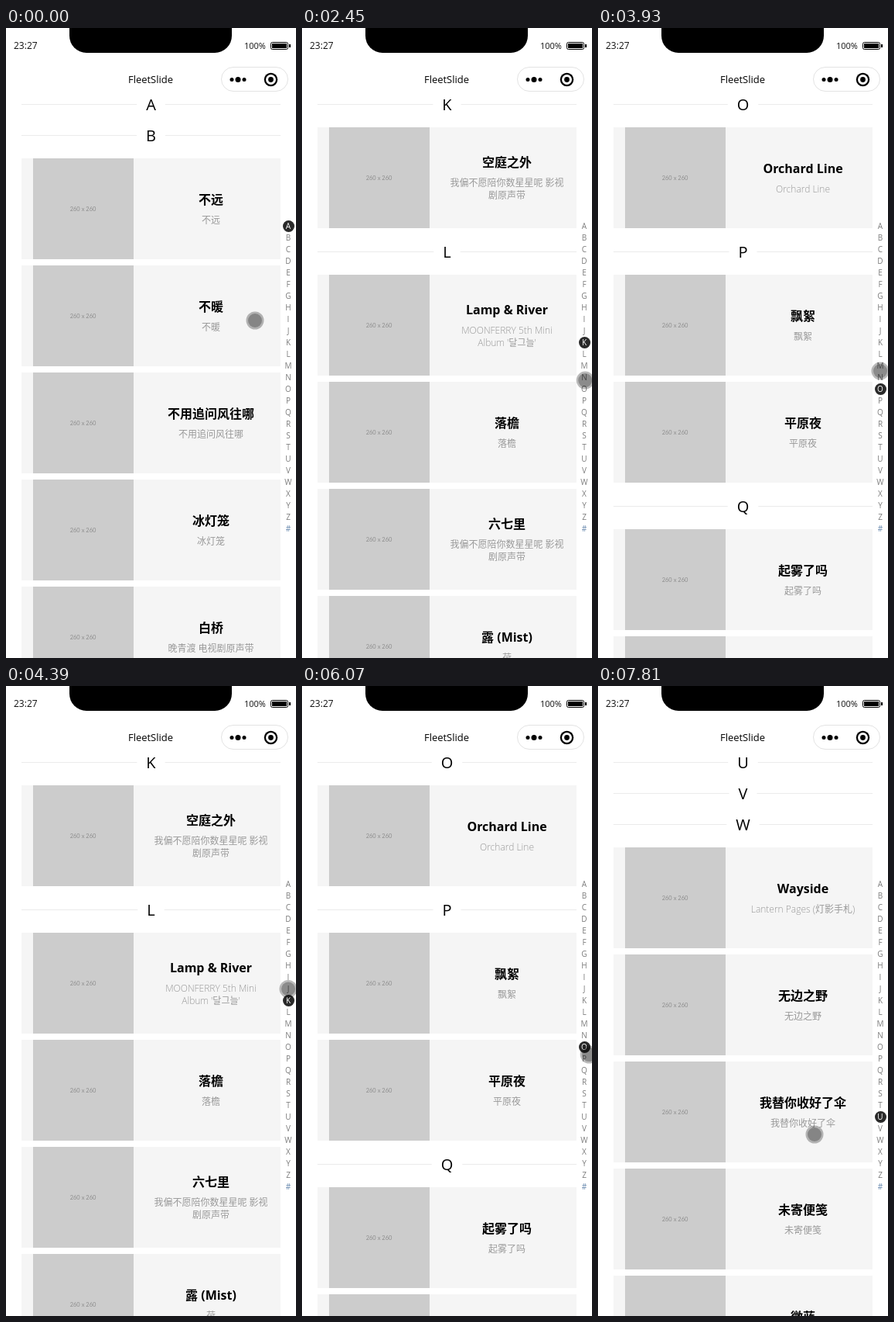
Recreate the animation shown at these times as an HTML page with a canvas. Size 375 by 812 pixels, loop 7910 ms.

```html
<!DOCTYPE html>
<html lang="zh">
<head>
<meta charset="utf-8">
<title>FleetSlide</title>
<style>
  html, body { margin: 0; width: 100%; height: 100%; overflow: hidden; background: #fff; }
  canvas { display: block; width: 375px; height: 812px; }
</style>
</head>
<body>
<canvas id="stage"></canvas>
<script>
const W = 375, H = 812, LOOP = 7910, TICK = 92;
const FONT = '"Open Sans", "Noto Sans CJK SC", "Noto Sans CJK", sans-serif';
const LETTERS = 'ABCDEFGHIJKLMNOPQRSTUVWXYZ#';
const INDEX_X = 365, INDEX_TOP = 255, INDEX_STEP = 15;
const DRAMA = '晚青渡 电视剧原声带';
const SERIES = '我偏不愿陪你数星星呢 影视\n剧原声带';

// Each entry is a title, or "title|subtitle" when they differ.
const SONGS = {
  B: ['不远', '不暖', '不用追问风往哪', '冰灯笼', '白桥|' + DRAMA],
  G: ['孤檐', '关于晴天', '归巢里'],
  H: ['海盐糖', '画窗', '和风旧信'],
  J: ['旧码头', '借光'],
  K: ['空庭之外|' + SERIES],
  L: ["Lamp & River|MOONFERRY 5th Mini\nAlbum '달그늘'", '落檐', '六七里|' + SERIES, '露 (Mist)|荷'],
  M: ['慢车窗', '梦里檐声'],
  N: ['南岸灯', '你说的晚霞'],
  O: ['Orchard Line'],
  P: ['飘絮', '平原夜'],
  Q: ['起雾了吗', '浅滩', '晴窗'],
  R: ['日暮渡', '热浪边'],
  S: ['Salt Comet|Velvetaria',
      'Sundial (Odel\nFarnik Remix)|Sundial (Odel Farnik Remix)',
      '霜 (ICE)|荷', '拾叶|' + DRAMA,
      '山谷不曾随意沉睡\n(纯享版)|拂晓台2031 第5期 (纯享版)'],
  T: ['听檐', '天边石'],
  W: ['Wayside|Lantern Pages (灯影手札)', '无边之野', '我替你收好了伞', '未寄便笺', '微蓝']
};

const REST = { x: 322, y: 377 };
const MOVES = [
  { from: 80, to: 610, x: 365, y: 343 },
  { from: 1070, to: 1530, x: 367, y: 404 },
  { from: 2170, to: 2910, x: 365, y: 524 },
  { from: 3290, to: 4590, x: 365, y: 375 },
  { from: 4770, to: 5510, x: 370, y: 408 },
  { from: 5590, to: 6530, x: 372, y: 526 },
  { from: 6620, to: 7070, x: 367, y: 559 },
  { from: 7350, to: 7810, x: 280, y: 578 }
];
const FIRST_TAP = 790, SECOND_TAP = 1990, DRAG_START = 3110, DRAG_END = 7070, DRAG_LAG = 100;

const canvas = document.getElementById('stage');
const ratio = window.devicePixelRatio || 1;
canvas.width = W * ratio;
canvas.height = H * ratio;
const ctx = canvas.getContext('2d');
ctx.scale(ratio, ratio);

const ease = k => k * k * (3 - 2 * k);

// The pointer is sampled in ticks, so it advances in even jumps of time.
function pointerAt(time) {
  let { x, y } = REST;
  for (const move of MOVES) {
    if (time < move.from) break;
    const span = move.to - move.from;
    const gaps = Math.round(span / TICK);
    const done = Math.floor((time - move.from) / span * gaps + 1.1);
    const k = ease(Math.min(1, done / (gaps + 1)));
    x += (move.x - x) * k;
    y += (move.y - y) * k;
  }
  return { x, y };
}

function letterAt(time) {
  if (time < FIRST_TAP) return 0;
  let touch = Math.min(time - DRAG_LAG, DRAG_END);
  if (time < DRAG_START) touch = time < SECOND_TAP ? FIRST_TAP : SECOND_TAP;
  return Math.round((pointerAt(touch).y - INDEX_TOP) / INDEX_STEP);
}

function text(str, x, y, size, color, weight = 'normal', align = 'center', family = FONT) {
  ctx.font = `${weight} ${size}px ${family}`;
  ctx.textAlign = align;
  ctx.fillStyle = color;
  ctx.fillText(str, x, Math.round(y + size * 0.36));
}

function rect(x, y, w, h, color) {
  ctx.fillStyle = color;
  ctx.fillRect(x, y, w, h);
}

function disc(x, y, r, color) {
  ctx.fillStyle = color;
  ctx.beginPath();
  ctx.arc(x, y, r, 0, Math.PI * 2);
  ctx.fill();
}

function outline(x, y, w, h, r, color) {
  ctx.strokeStyle = color;
  ctx.lineWidth = 1;
  ctx.beginPath();
  ctx.roundRect(x, y, w, h, r);
  ctx.stroke();
}

function drawHeader(letter, y) {
  ctx.font = `20px ${FONT}`;
  const gap = ctx.measureText(letter).width / 2 + 12;
  const side = 167.5 - gap;
  rect(20, y, side, 1, '#ebebeb');
  rect(355 - side, y, side, 1, '#ebebeb');
  text(letter, 187.5, y + 1, 20, '#000');
}

function drawCard(song, top) {
  const [title, sub = title] = song.split('|');
  const titleLines = title.split('\n'), subLines = sub.split('\n');
  rect(20, top, 335, 130, '#f5f5f5');
  rect(35, top, 130, 130, '#ccc');
  text('260 x 260', 99.5, top + 65, 7.5, '#8e8e8e', 'normal', 'center', 'Lato, sans-serif');
  const height = titleLines.length * 21 + 8 + subLines.length * 16;
  let y = top + 65 - height / 2 + 10.5;
  for (const line of titleLines) {
    text(line, 265, y, 16, '#000', 'bold');
    y += 21;
  }
  y += 6;
  for (const line of subLines) {
    text(line, 265, y, 12, '#999', '300');
    y += 16;
  }
}

function drawList(first) {
  let y = 98;
  for (let i = first; i < LETTERS.length && y < H + 20; i++) {
    const songs = SONGS[LETTERS[i]] || [];
    drawHeader(LETTERS[i], y);
    songs.forEach((song, n) => drawCard(song, y + 30 + n * 138));
    y += songs.length ? songs.length * 138 + 52 : 40;
  }
}

function drawIndex(selected) {
  [...LETTERS].forEach((letter, i) => {
    const y = INDEX_TOP + i * INDEX_STEP;
    if (i === selected) disc(INDEX_X + 0.5, y + 0.5, 7.5, '#2a2a2a');
    const color = i === selected ? '#fff' : letter === '#' ? '#6486ac' : '#7d7d7d';
    text(letter, INDEX_X, y, 10, color);
  });
}

function drawChrome() {
  ctx.fillStyle = '#000';
  ctx.beginPath();
  ctx.roundRect(82, -20, 210, 52, [0, 0, 22, 22]);
  ctx.fill();

  text('23:27', 10, 23, 12, '#111', 'normal', 'left');
  text('100%', 308, 23, 11, '#111', 'normal', 'left');
  outline(342.5, 18.5, 22, 9, 2, '#000');
  rect(344, 20, 19, 6, '#000');
  rect(366, 21, 2, 4, '#000');

  text('FleetSlide', 187, 66, 13, '#000');
  outline(278.5, 50.5, 86, 31, 15.5, '#e3e3e3');
  for (const side of [-1, 0, 1]) disc(300 + side * 8, 66.5, side ? 2.5 : 3.5, '#000');
  disc(342.5, 66.5, 8.7, '#000');
  disc(342.5, 66.5, 6.5, '#fff');
  disc(342.5, 66.5, 3.4, '#000');
}

function drawPointer({ x, y }) {
  disc(x, y, 11.5, 'rgba(0,0,0,.27)');
  disc(x, y, 9, 'rgba(0,0,0,.25)');
}

function render() {
  const time = performance.now() % LOOP;
  const selected = letterAt(time);
  rect(0, 0, W, H, '#fff');
  drawList(selected);
  drawChrome();
  drawIndex(selected);
  drawPointer(pointerAt(time));
  requestAnimationFrame(render);
}
render();
</script>
</body>
</html>
```
